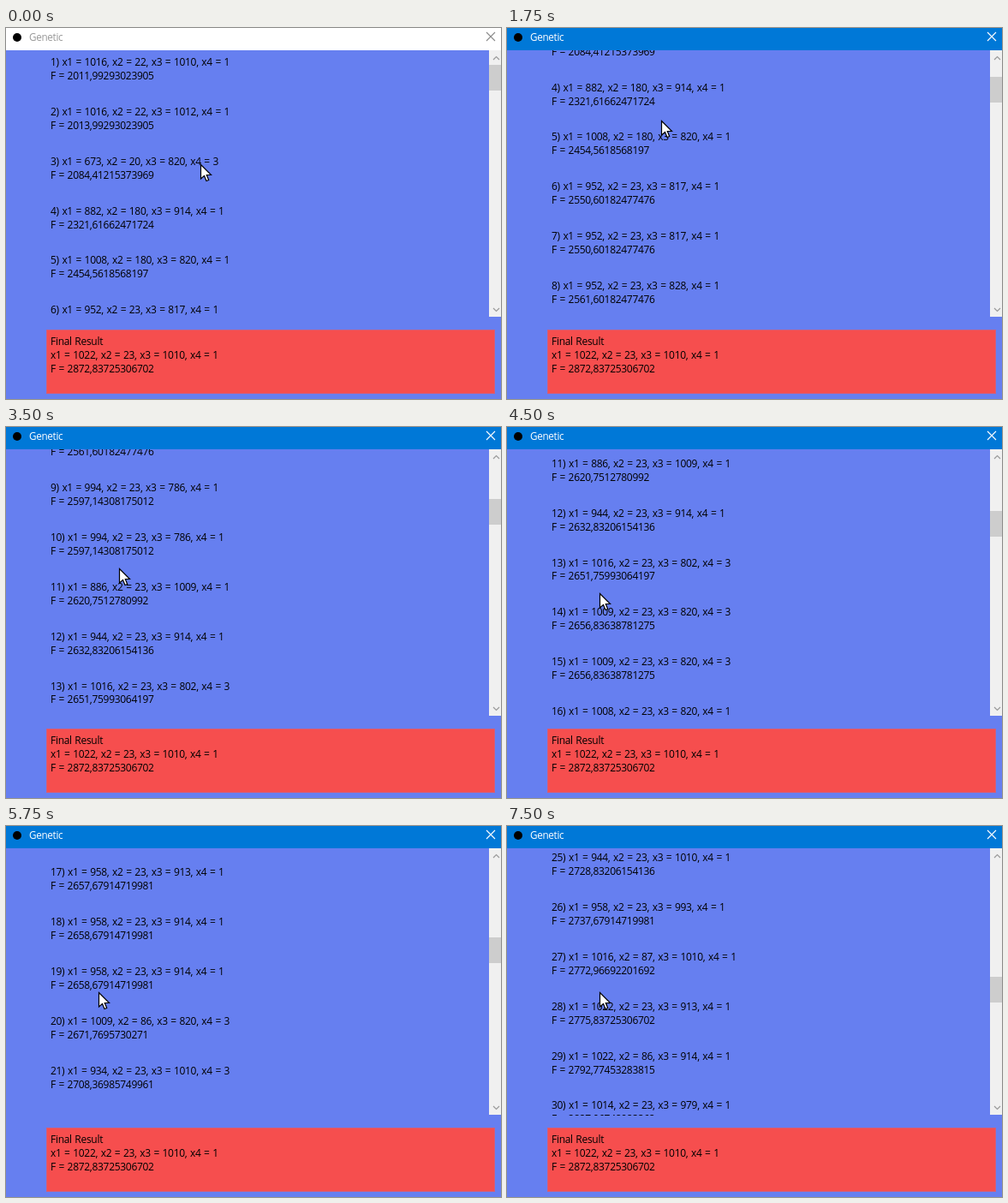
An HTML page with a canvas that plays this animation: 578x433 px, repeating every 8000 ms.

```html
<!DOCTYPE html>
<html lang="en">
<head>
<meta charset="utf-8">
<title>Genetic</title>
<style>
  html, body { margin: 0; width: 100%; height: 100%; overflow: hidden; background: #667ff0; }
  canvas { display: block; width: 578px; height: 433px; }
</style>
</head>
<body>
<canvas id="stage" width="578" height="433"></canvas>
<script>
const ctx = document.getElementById('stage').getContext('2d');
const LOOP = 8000, STEP = 250;
const PITCH = 57.88, LINE = 15.96, TICK = 48, THUMB_RATE = 0.0955;
const FONT = '"Open Sans", "Noto Sans", sans-serif';
const BLUE = '#667ff0';

// The function being maximised, printed with 15 significant digits
const fitness = (x1, x2, x3, x4) => x1 * (1 + Math.abs(Math.sin(x2))) + x3 - x2 - x4;
const format = v => String(+v.toPrecision(15)).replace('.', ',');

function describe(x1, x3, x2 = 23, x4 = 1) {
  return [
    `x1 = ${x1}, x2 = ${x2}, x3 = ${x3}, x4 = ${x4}`,
    `F = ${format(fitness(x1, x2, x3, x4))}`
  ];
}

// Listed individuals as x1/x3[/x2[/x4]]; "=" repeats the one before
const population = `1016/1010/22 1016/1012/22 673/820/20/3 882/914/180 1008/820/180
  952/817 = 952/828 994/786 = 886/1009 944/914 1016/802/23/3 1009/820/23/3 = 1008/820
  958/913 958/914 = 1009/820/86/3 934/1010/23/3 = 950/981 950/981/86 944/1010
  958/993 1016/1010/87 1022/913 1022/914/86 1014/979`.split(/\s+/);

let genes;
const results = population.map((item, i) => {
  if (item !== '=') genes = item.split('/').map(Number);
  const [vars, value] = describe(...genes);
  return [`${i + 1}) ${vars}`, value];
});
const best = ['Final Result', ...describe(1022, 1010)];

// Time, then wheel ticks or pointer tip
const wheel = [[1250, 0], [2500, 7], [3000, 9], [4000, 9], [5250, 17.2], [5500, 17.2], [7500, 28.6]];
const pointer = [[500, 227, 159], [1000, 178, 84], [1250, 178, 84], [1500, 180, 108],
  [3000, 180, 108], [3750, 108, 194]];

function along(keys, t) {
  const i = keys.findIndex(k => k[0] > t);
  if (i <= 0) return keys.at(i).slice(1);
  const a = keys[i - 1], b = keys[i];
  const p = (t - a[0]) / (b[0] - a[0]);
  return a.slice(1).map((v, n) => v + (b[n + 1] - v) * p);
}

function rect(color, x, y, w, h) {
  ctx.fillStyle = color;
  ctx.fillRect(x, y, w, h);
}

function text(str, x, y, color = '#000', size = 12) {
  ctx.font = `${size}px ${FONT}`;
  ctx.fillStyle = color;
  ctx.fillText(str, x, Math.round(y));
}

function trace(points) {
  points.forEach(([x, y], i) => i ? ctx.lineTo(x, y) : ctx.moveTo(x, y));
}

function stroke(color, width, ...lines) {
  ctx.strokeStyle = color;
  ctx.lineWidth = width;
  ctx.beginPath();
  lines.forEach(trace);
  ctx.stroke();
}

function titleBar(active) {
  rect(active ? '#0078d7' : '#fff', 0, 0, 578, 26);
  ctx.fillStyle = '#000';
  ctx.beginPath();
  ctx.arc(13, 11, 5, 0, Math.PI * 2);
  ctx.fill();
  text('Genetic', 27, 15, active ? '#fff' : '#999', 11.7);
  stroke(active ? '#fff' : '#8a8a8a', 1.1,
    [[561, 5], [571, 15]], [[571, 5], [561, 15]]);
}

function list(scroll) {
  ctx.save();
  ctx.beginPath();
  ctx.rect(0, 26, 564, 312);
  ctx.clip();
  results.forEach((lines, i) => lines.forEach((line, n) =>
    text(line, 52, 43.97 + i * PITCH + n * LINE - scroll)));
  ctx.restore();
}

function scrollBar(scroll) {
  rect('#f0f0f0', 564, 26, 14, 311);
  rect('#cdcdcd', 564, Math.round(43 + scroll * THUMB_RATE), 14, 30);
  for (const [base, dir] of [[37, -1], [327, 1]]) {
    stroke('#9a9a9a', 1.2, [[569, base], [572.5, base + dir * 3.5], [576, base]]);
  }
}

function resultPanel() {
  rect('#f64e4e', 47, 352, 524, 75);
  // Soft edge where the panel meets the background
  ctx.strokeStyle = '#cf5f7c';
  ctx.lineWidth = 1;
  ctx.strokeRect(47.5, 352.5, 523, 74);
  best.forEach((line, i) => text(line, 52, 370 + i * 16));
}

function arrow(x, y) {
  ctx.save();
  ctx.translate(x + 0.5, y + 0.5);
  ctx.beginPath();
  trace([[0, 0], [0, 16.5], [4, 13], [6.5, 19], [9.2, 18], [6.8, 12], [12, 12]]);
  ctx.closePath();
  ctx.fillStyle = '#fff';
  ctx.fill();
  ctx.strokeStyle = '#000';
  ctx.lineWidth = 1.2;
  ctx.stroke();
  ctx.restore();
}

function draw(t) {
  const scroll = Math.round(along(wheel, t)[0]) * TICK;
  rect(BLUE, 0, 0, 578, 433);
  list(scroll);
  scrollBar(scroll);
  resultPanel();
  titleBar(t >= STEP);
  arrow(...along(pointer, t).map(Math.round));
}

ctx.letterSpacing = '-0.3px';
ctx.wordSpacing = '0.75px';
const start = performance.now();
function tick() {
  const t = (performance.now() - start) % LOOP;
  draw(Math.floor(t / STEP) * STEP);
  requestAnimationFrame(tick);
}
tick();
</script>
</body>
</html>
```
